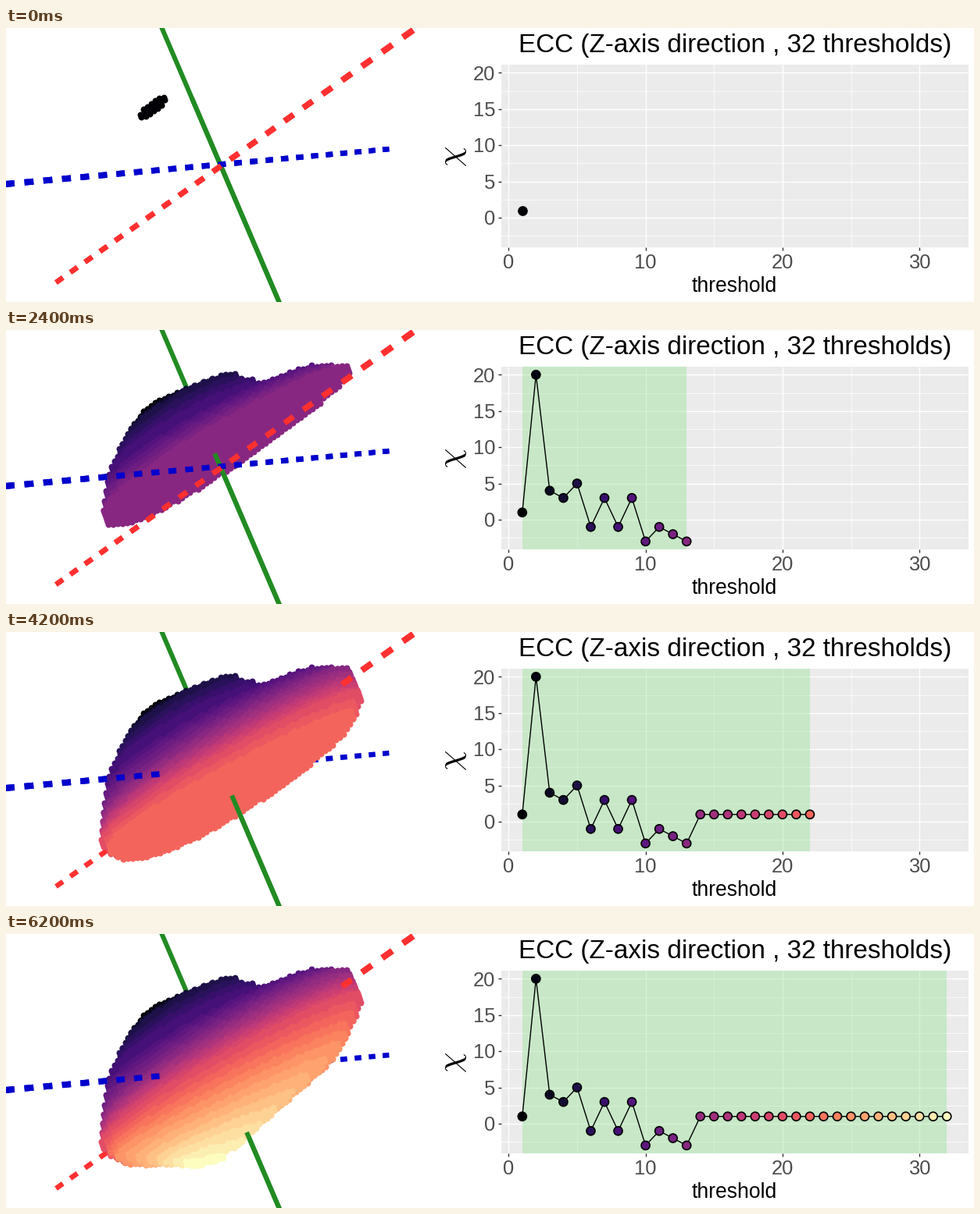
Recreate the animation shown at these times as a matplotlib script. Size 1239 by 351 pixels, loop 6400 ms.

```python
import numpy as np
import matplotlib.pyplot as plt
from matplotlib.animation import FuncAnimation
from matplotlib.collections import LineCollection
from matplotlib.patches import Rectangle
from matplotlib.path import Path

W, H, STEPS = 1239, 351, 32
SANS = "Liberation Sans"
GREEN, RED, BLUE = "#228B22", "#FF3030", "#0000CD"

plt.rcParams["toolbar"] = "None"
plt.rcParams["mathtext.fontset"] = "cm"
fig = plt.figure(figsize=(W / 72, H / 72), dpi=72, facecolor="white")
ax = fig.add_axes([0, 0, 1, 1])
ax.set_xlim(0, W)
ax.set_ylim(H, 0)
ax.axis("off")
colors = [plt.get_cmap("magma")(k / (STEPS - 1)) for k in range(STEPS)]

# Solid made of lens-shaped layers; each key: level, left x y, right x y,
# bulge above and below the line between the ends
UPPER_LOBE = [(1, 169, 117, 210, 84, 8, 8),
              (5, 149, 160, 298, 57, 27, 9),
              (9, 127, 209, 345, 72, 31, 20)]
LOWER_LOBE = [(3, 180, 134, 312, 76, 6, 17),
              (9, 140, 208, 404, 47, 12, 26)]
BODY = [(9, 127, 209, 404, 47, 29, 28),
        (13, 123, 246, 443, 46, 32, 31),
        (20, 121, 274, 455, 76, 26, 50),
        (25, 140, 284, 430, 136, 12, 40),
        (32, 225, 293, 285, 283, 4, 9)]
DOT, INSET = 8, 2


def lens(keys, t):
    """Closed outline of the layer at level t."""
    level, *columns = np.transpose(keys)
    lx, ly, rx, ry, up, down = [np.interp(t, level, c) for c in columns]
    left, right = np.array([lx, ly]), np.array([rx, ry])
    d = (right - left) / np.hypot(*(right - left))
    normal = np.array([d[1], -d[0]])
    left, right = left + INSET * d, right - INSET * d
    theta = np.linspace(0, np.pi, 50)
    u = (1 - np.cos(theta)) / 2
    spine = left + u[:, None] * (right - left)
    profile = np.abs(np.sin(theta)) ** 0.75 * (1.2 - 0.4 * u)

    def bulge(width):
        return np.maximum(width * profile - INSET, 0.5)[:, None] * normal

    return np.vstack([spine + bulge(up), (spine - bulge(down))[::-1]])


def outlines(t):
    if t >= BODY[0][0]:
        return [lens(BODY, t)]
    return [lens(lobe, t) for lobe in (UPPER_LOBE, LOWER_LOBE)
            if t >= lobe[0][0]]


i, j = np.meshgrid(np.arange(-110, 111), np.arange(-60, 61))
lattice = np.column_stack([(i + 6 * j).ravel(), (3.1 * i - 0.55 * j).ravel()])


def make_slice(t):
    """One layer of dots in its own colour."""
    dots = lattice + [276, 175] + (t - 16.2) * np.array([2.42, 5.67])
    inside = np.any([Path(shape).contains_points(dots)
                     for shape in outlines(t)], axis=0)
    return ax.plot(*dots[inside].T, "o", ms=DOT, mew=0, color=colors[t - 1],
                   zorder=2 + t / 100)[0]


def dashes(start, end, step, ratio, widths):
    """Dash segments whose spacing changes with perspective."""
    start, end = np.array(start, float), np.array(end, float)
    length = np.hypot(*(end - start))
    d = (end - start) / length
    segs, lws, pos = [], [], 0
    while pos < length:
        stop = min(pos + 0.48 * step, length)
        segs.append((start + pos * d, start + stop * d))
        lws.append(np.interp(pos, [0, length], widths))
        pos += step
        step *= ratio
    return segs, lws


def draw_dashes(dash, color, z, keep=lambda x: True):
    kept = [(s, w) for s, w in zip(*dash) if keep(s[0][0])]
    return ax.add_collection(LineCollection(
        [s for s, _ in kept], linewidths=[w for _, w in kept],
        colors=color, capstyle="butt", zorder=z))


def axis_x(y):
    return 199.5 + 0.4275 * y


red = dashes((64, 326), (532, -5), 22.5, 1.0195, (6.5, 8))
blue = dashes((-1, 200), (491, 155), 24.7, 0.9853, (8, 6.5))
draw_dashes(blue, BLUE, 1.1)
draw_dashes(red, RED, 1.2)
ax.plot([axis_x(-5), axis_x(355)], [-5, 355], color=GREEN, lw=6, zorder=1)
slices = [make_slice(t) for t in range(1, STEPS + 1)]
green_front, = ax.plot([], [], color=GREEN, lw=6, zorder=5,
                       solid_capstyle="butt")
full_front = [draw_dashes(blue, BLUE, 6), draw_dashes(red, RED, 7)]
part_front = [draw_dashes(blue, BLUE, 6, lambda x: x < 194),
              draw_dashes(red, RED, 7, lambda x: x > 424)]

# Chart
CHI = [1, 20, 4, 3, 5, -1, 3, -1, 3, -3, -1, -2, -3] + [1] * 19
LEFT, RIGHT, TOP, BOTTOM = 634, 1231.5, 47, 281


def px(v):
    return 643.3 + 17.53 * np.asarray(v)


def py(v):
    return 243 - 9.285 * np.asarray(v)


def label(x, y, text, size, color="black", ha="center"):
    ax.text(x, y, text, fontsize=size, color=color, ha=ha, va="baseline",
            family=SANS)


def rule(xs, ys, color="white", lw=1.4):
    ax.plot(xs, ys, color=color, lw=lw, zorder=2, solid_capstyle="butt")


ax.add_patch(Rectangle((LEFT, TOP), RIGHT - LEFT, BOTTOM - TOP,
                       fc="#EBEBEB", lw=0, zorder=1))
for v in np.arange(5, 30, 10):
    rule([px(v)] * 2, [TOP, BOTTOM], lw=0.7)
for v in np.arange(-2.5, 20, 5):
    rule([LEFT, RIGHT], [py(v)] * 2, lw=0.7)
for v in range(0, 31, 10):
    rule([px(v)] * 2, [TOP, BOTTOM])
    rule([px(v)] * 2, [BOTTOM, BOTTOM + 4], "#333333")
    label(px(v), 307.5, str(v), 25.5, "#4D4D4D")
for v in range(0, 21, 5):
    rule([LEFT, RIGHT], [py(v)] * 2)
    rule([LEFT - 4, LEFT], [py(v)] * 2, "#333333")
    label(626.5, py(v) + 9.3, str(v), 25.5, "#4D4D4D", "right")
label(933.4, 31, "ECC (Z-axis direction , 32 thresholds)", 33.28)
label(932.7, 338, "threshold", 26.5)
ax.text(571, 164.5, r"$\chi$", fontsize=42, rotation=90,
        ha="center", va="center")

band = ax.add_patch(Rectangle((px(1), TOP), 0, BOTTOM - TOP, lw=0, alpha=0.4,
                              fc="#93E393", zorder=3))
curve, = ax.plot([], [], color="black", lw=1.4, zorder=4)
all_points = np.column_stack([px(np.arange(1, STEPS + 1)), py(CHI)])
points = ax.scatter(*all_points.T, s=11 ** 2, c=colors, edgecolors="black",
                    linewidths=1.7, zorder=5)


def update(frame):
    t = frame + 1
    for k, layer in enumerate(slices):
        layer.set_visible(k < t)
    # The vertical axis leaves the solid where the newest layer cuts it
    y = min(84 + 5.7 * t, 254)
    green_front.set_data([axis_x(y), axis_x(355)], [y, 355])
    for item in full_front:
        item.set_visible(t <= 16)
    for item in part_front:
        item.set_visible(t > 16)
    band.set_width(px(t) - px(1))
    curve.set_data(*all_points[:t].T)
    points.set_offsets(all_points[:t])
    points.set_facecolors(colors[:t])
    return []


anim = FuncAnimation(fig, update, frames=STEPS, interval=200, repeat=True,
                     repeat_delay=0, blit=False)
plt.show()
```
